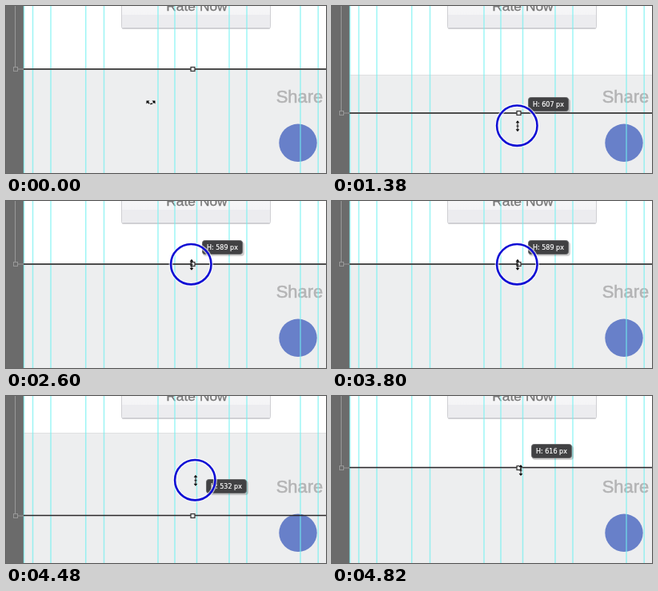
An HTML page for the animation above (4840 ms loop, 400 by 209 pixels).

```html
<!DOCTYPE html>
<html lang="en">
<head>
<meta charset="utf-8">
<title>Resizing a shape</title>
<style>
  html, body { margin: 0; width: 100%; height: 100%; overflow: hidden; background: #fff; }
  svg { display: block; width: 400px; height: 209px; }
  text { font-family: "Liberation Sans", Arial, sans-serif; }
  #label text { font: 8px "DejaVu Sans", sans-serif; fill: #fff; stroke: #fff; stroke-width: .2; }
</style>
</head>
<body>
<svg viewBox="0 0 400 209">
  <defs>
    <linearGradient id="face" x1="0" y1="0" x2="0" y2="1">
      <stop offset="0" stop-color="#fafafb"/>
      <stop offset="1" stop-color="#f1f1f3"/>
    </linearGradient>
    <path id="tip" d="M0-7 L-2.400-4 H2.400 Z"/>
  </defs>

  <rect width="400" height="209" fill="#fff"/>
  <rect x="144.5" y="-20" width="186" height="49" rx="2" fill="#d2d2d5"/>
  <rect x="144.5" y="-20" width="186" height="47.5" rx="2" fill="url(#face)" stroke="#cfcfd3"/>
  <rect x="145" y="11" width="185" height="16" fill="#ececef"/>
  <text x="238.500" y="5.500" font-size="17.4" text-anchor="middle" fill="#777" stroke="#777" stroke-width=".25">Rate Now</text>

  <g id="fill">
    <rect x="22" width="378" height="240" fill="#edeeef"/>
    <rect x="22" width="378" height="1" fill="#dfe0e1"/>
  </g>
  <text x="337.700" y="121.300" font-size="21.9" fill="#b4b4b5" stroke="#b4b4b5" stroke-width=".6">Share</text>
  <circle cx="365" cy="171.300" r="23.700" fill="#6880c9"/>

  <rect width="22" height="209" fill="#6b6b6b"/>
  <g id="guides" stroke="#6ff0f0" stroke-opacity=".68" stroke-width="1.500"></g>

  <rect id="side" x="11" width="1" fill="#989898"/>
  <g id="edge">
    <rect x="12" y="-.5" width="10" height="1" fill="#989898"/>
    <rect id="bar" x="22" width="378"/>
    <rect x="9.500" y="-2.500" width="5" height="5" fill="#6b6b6b" stroke="#989898"/>
    <rect x="231" y="-2.500" width="5" height="5" fill="#e6e6e6" stroke="#333" stroke-width="1.200"/>
  </g>

  <g id="label">
    <rect x="1" y="2" width="52" height="18" rx="4" fill="#000" opacity=".18"/>
    <rect x=".5" y=".5" width="50" height="17" rx="3" fill="#414143" stroke="#68686a"/>
    <text id="size" x="6" y="12"></text>
  </g>

  <g id="cursor">
    <g id="resize" stroke="#fff" stroke-width=".6" paint-order="stroke">
      <use href="#tip"/>
      <use href="#tip" transform="scale(1 -1)"/>
      <path d="M0-5V5" stroke="#111" stroke-width="1"/>
      <path d="M-1.500 0H1.500" stroke="#111" stroke-width="1"/>
    </g>
    <g id="rotate">
      <path d="M-4-1Q0 4 4-1" fill="none" stroke="#111" stroke-width="1.500" stroke-dasharray="3 1"/>
      <path d="M-5.500-2.500h4l-4 4zM5.500-2.500h-4l4 4z"/>
    </g>
  </g>
  <g id="ring" fill="none">
    <circle r="25.200" stroke="#fff" stroke-opacity=".65" stroke-width="5"/>
    <circle r="25.200" stroke="#100ed4" stroke-width="2.600"/>
  </g>
</svg>
<script>
const LOOP = 4840, GRAB = 1020, REGRAB = 4260;
const LAG = { label: 23, line: 50, fill: 140 };
const GUIDES = [22.5, 33.5, 56, 99.7, 122.5, 190, 211, 238.5, 279, 301, 368, 390.2];

// Tracks are [time, value] pairs.
const edgeY = [[1020, 79], [1110, 46], [1200, 79], [1390, 150], [1640, 78.5],
  [1820, 78.5], [1840, 79], [4260, 79], [4340, 46], [4430, 150], [4530, 60],
  [4600, 115], [4670, 90]];
const pointerX = [[40, 181], [380, 232], [4260, 232], [4430, 237], [4600, 237], [4670, 236]];
const approachY = [[40, 121], [380, 76]];
const gripOffset = [[1020, -3], [1200, .7], [4600, .7], [4670, 3]];

const $ = id => document.getElementById(id);
const show = (id, on) => $(id).setAttribute('visibility', on ? 'visible' : 'hidden');
const move = (id, x, y) => $(id).setAttribute('transform', `translate(${x} ${y})`);

function at(track, t) {
  const i = track.findIndex(k => k[0] > t);
  if (i === 0) return track[0][1];
  if (i < 0) return track[track.length - 1][1];
  const [t0, a] = track[i - 1], [t1, b] = track[i];
  return a + (b - a) * (1 - Math.cos(Math.PI * (t - t0) / (t1 - t0))) / 2;
}

function height(y) {
  return Math.floor(589.3 + (y - 79) * (y < 79 ? 1.727 : 2.45));
}

// The bar is thinner and darker while the second drag is on.
function styleBar(dragging) {
  const weight = dragging ? 1.5 : 2;
  $('bar').setAttribute('y', dragging ? -1.25 : -1);
  $('bar').setAttribute('height', weight);
  $('bar').setAttribute('fill', dragging ? '#2a2629' : '#4c4c4c');
}

function draw(t) {
  const line = Math.round(at(edgeY, t - LAG.line));
  const fill = at(edgeY, t - LAG.fill);
  const x = at(pointerX, t);
  const y = t < GRAB ? at(approachY, t) : at(edgeY, t) + at(gripOffset, t);

  move('fill', 0, Math.round(fill));
  move('edge', 0, line);
  $('side').setAttribute('height', line);
  styleBar(t >= REGRAB);

  move('cursor', x, y);
  show('rotate', t < 300);
  show('resize', t >= 300);
  move('ring', x - .7, y - .5);
  show('ring', t >= 560 && t < 4720);

  move('label', Math.round(x + 13), Math.round(at(edgeY, t - LAG.label) - 30.4));
  show('label', t >= GRAB + 20);
  $('size').textContent = `H: ${height(fill)} px`;
}

for (const x of GUIDES) {
  const guide = document.createElementNS('http://www.w3.org/2000/svg', 'path');
  guide.setAttribute('d', `M${x} 0V209`);
  $('guides').append(guide);
}

const start = performance.now();
function tick() {
  const t = (performance.now() - start) % LOOP;
  draw(Math.floor(t / 20) * 20);
  requestAnimationFrame(tick);
}
tick();
</script>
</body>
</html>
```
